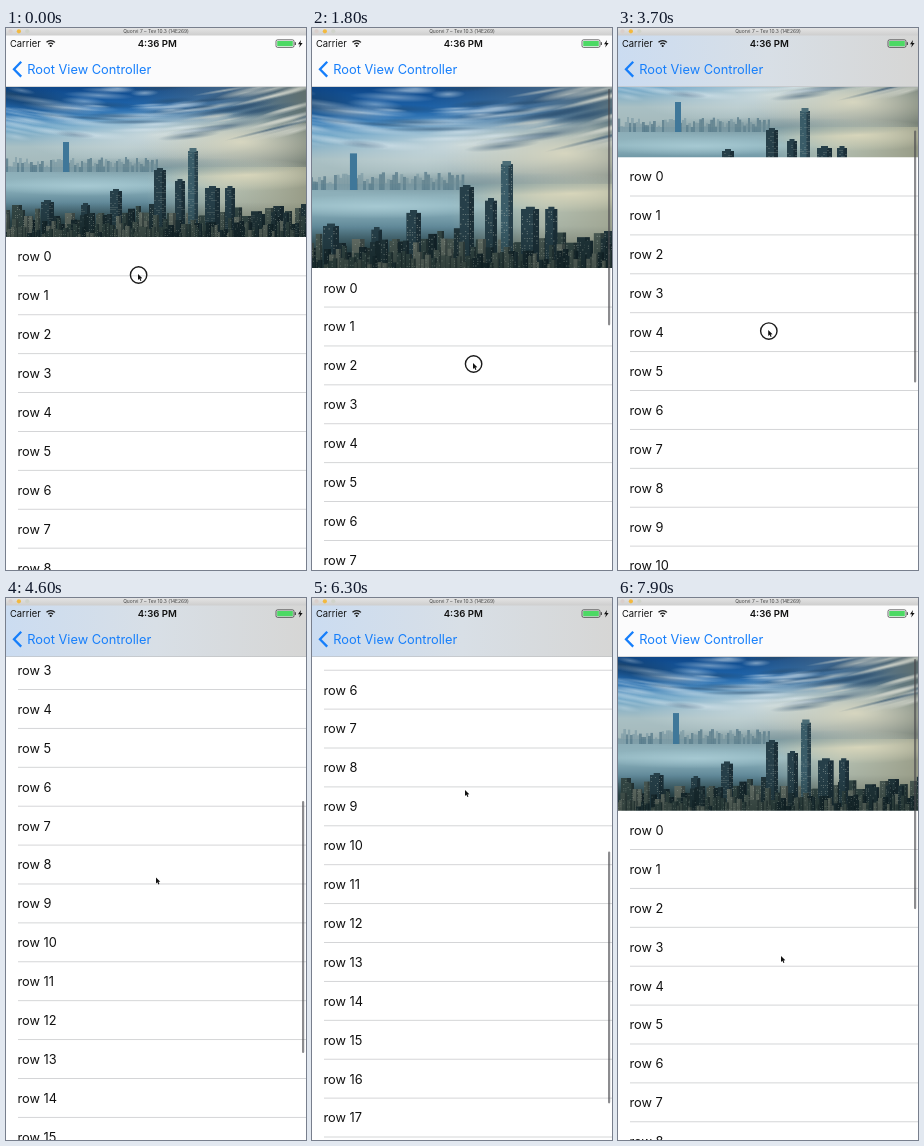
Write an HTML page with a canvas that moves like this. It is 300 px wide and 542 px high and loops after 8 s.

```html
<!DOCTYPE html>
<html lang="en">
<head>
<meta charset="utf-8">
<title>Stretchy header</title>
<style>
  html, body { margin: 0; width: 100%; height: 100%; overflow: hidden; background: #fff; }
  canvas { display: block; width: 300px; height: 542px; }
</style>
</head>
<body>
<canvas id="stage"></canvas>
<script>
const W = 300, H = 542, LOOP = 8000, STEP = 100;
const NAV = 59, HEAD = 150, ROW = 38.9, ROWS = 20;
const SLOP = 11, RUBBER = .4;
const FONT = 'Inter, Roboto, "Liberation Sans", sans-serif';
const BLUE = '#157efb';

const canvas = document.getElementById('stage');
const dpr = window.devicePixelRatio || 1;
canvas.width = W * dpr;
canvas.height = H * dpr;
const ctx = canvas.getContext('2d');
ctx.scale(dpr, dpr);

// Pointer stops: time, x, y
const stops = [
  [0, 132, 246], [900, 150, 385], [1800, 161, 335], [2700, 151, 393], [3000, 151, 393],
  [4000, 150, 277], [5500, 150, 284], [5900, 152, 214], [6300, 153, 192], [6800, 154, 192],
  [7400, 163, 358], [LOOP, 163, 358]
];
// Each drag ends in a glide that settles at rest
const drags = [
  { press: 0, release: 2000, rest: 0, glide: 120 },
  { press: 2700, release: 4000, rest: 310, glide: 350 },
  { press: 5500, release: 5900, rest: 372, glide: 350 },
  { press: 6800, release: 7400, rest: -6, glide: 110 }
];

const clamp = (v, a = 0, b = 1) => Math.min(b, Math.max(a, v));
const mix = (a, b, u) => a + (b - a) * u;
const ease = u => u * u * (3 - 2 * u);

function pointerAt(t) {
  const i = Math.max(1, stops.findIndex(s => s[0] >= t));
  const [t0, x0, y0] = stops[i - 1], [t1, x1, y1] = stops[i];
  const u = ease((t - t0) / (t1 - t0));
  return { x: mix(x0, x1, u), y: mix(y0, y1, u) };
}

// Content follows the finger, resists above the top, then decays to rest
function scrollAt(t) {
  let s = 0;
  for (const { press, release, rest, glide } of drags) {
    if (t < press) break;
    const moved = pointerAt(press).y - pointerAt(Math.min(t, release)).y;
    s += Math.sign(moved) * Math.max(0, Math.abs(moved) - SLOP);
    if (s < 0) s *= RUBBER;
    if (t > release) s = mix(rest, s, Math.exp((release - Math.min(t, nextPress(release))) / glide));
  }
  return s;
}

function nextPress(t) {
  const next = drags.find(d => d.press > t);
  return next ? next.press : LOOP;
}

function random(seed) {
  return () => (seed = (seed * 16807) % 2147483647) / 2147483647;
}

function ramp(c, x0, y0, x1, y1, colors) {
  const g = c.createLinearGradient(x0, y0, x1, y1);
  colors.forEach((color, i) => g.addColorStop(i / (colors.length - 1), color));
  return g;
}

function paintSkyline() {
  const art = document.createElement('canvas');
  art.width = W * 3;
  art.height = HEAD * 3;
  const c = art.getContext('2d');
  c.scale(3, 3);
  const rnd = random(77);
  const rect = (x, y, w, h, color) => { c.fillStyle = color; c.fillRect(x, y, w, h); };

  // Soft ellipse fading out to its rim
  const puff = (x, y, rx, ry, tilt, color, alpha) => {
    const g = c.createRadialGradient(0, 0, 0, 0, 0, 1);
    g.addColorStop(0, color);
    g.addColorStop(1, color + '00');
    c.save();
    c.globalAlpha = alpha;
    c.translate(x, y);
    c.rotate(tilt);
    c.scale(rx, ry);
    c.fillStyle = g;
    c.fillRect(-1, -1, 2, 2);
    c.restore();
  };

  // Sky, warmer to the right
  rect(0, 0, W, 85, ramp(c, 0, 0, 0, 80, ['#0d4688', '#2067ae', '#6fa6c8', '#a9c0c4', '#a5b9bb']));
  rect(0, 0, W, 85, ramp(c, 120, 0, W, 0, ['#7c858300', '#7c858366', '#6c7468dd']));
  puff(150, 48, 130, 26, -.04, '#d8e2e2', .85);
  puff(235, 55, 100, 30, 0, '#dedbc2', .9);
  puff(20, 12, 70, 14, .15, '#143b63', .8);
  for (let i = 0; i < 90; i++) {
    const x = rnd() * W, y = rnd() * 50;
    const dark = i % 3 === 0;
    puff(x, y, 14 + rnd() * 32, 1.5 + rnd() * 3, (150 - x) / 600 - .05,
      dark ? '#24486a' : x > 200 ? '#d3d6cc' : '#e0ecf2', dark ? .5 : .3 + x / 700);
  }

  // Harbour with a hazy far shore
  rect(0, 80, W, 70, ramp(c, 0, 80, 0, 135, ['#89a9b3', '#93b8c2', '#5f8797', '#2f4a50']));
  rect(140, 80, 160, 70, ramp(c, 140, 0, W, 0, ['#c3c4ac00', '#c3c4acbb', '#989c87']));
  puff(240, 88, 90, 16, 0, '#dcd9bd', .9);
  puff(80, 99, 100, 10, 0, '#abcdd6', .8);
  for (let x = 0; x < 150; x += 2.2) {
    const h = 5 + rnd() * 10;
    rect(x, 85 - h, 2.4, h, rnd() > .5 ? '#7d9ba6aa' : '#4a7081aa');
  }
  puff(150, 80, 150, 10, 0, '#6f8d95', .6);
  rect(57, 55, 6, 30, '#3f7799');

  // Near city, from the water's edge to the front
  const tones = ['#20343a', '#354846', '#4c5b55', '#182a30', '#6a746b'];
  const tower = (x, y, w, color) => {
    rect(x, y, w, HEAD - y, color);
    rect(x + w * .65, y, w * .35, HEAD - y, '#0a182066');
    for (let wy = y + 2; wy < HEAD; wy += 2)
      for (let wx = x + .5; wx < x + w - 1; wx += 2)
        if (rnd() > .65) rect(wx, wy, 1, 1, '#b4bfb366');
  };
  const block = (base, spread, step) => {
    for (let x = -3; x < W; x += step * (.6 + rnd() * .5))
      tower(x, base + rnd() * spread, step * (.6 + rnd() * .6), tones[Math.floor(rnd() * 5)]);
  };
  block(116, 22, 9);
  const landmarks = [[35, 115, 13], [75, 118, 9], [104, 104, 12], [148, 83, 12],
    [169, 94, 10], [199, 101, 15], [219, 101, 10]];
  for (const [x, y, w] of landmarks) {
    tower(x, y, w, '#263f49');
    rect(x + w * .25, y - 2, w * .5, 3, '#263f49');
  }
  tower(182, 64, 10, '#3a5c68');
  rect(183.5, 61, 7, 4, '#4b6c76');
  block(125, 20, 6);
  block(135, 12, 5);
  rect(0, 115, W, 35, ramp(c, 0, 115, 0, HEAD, ['#0c1a1800', '#0c1a1866']));
  return art;
}

const skyline = paintSkyline();

function text(str, x, y, size, color, weight = 400, align = 'left') {
  ctx.font = `${weight} ${size}px ${FONT}`;
  ctx.fillStyle = color;
  ctx.textAlign = align;
  ctx.fillText(str, x, y);
}

function box(x, y, w, h, color) {
  ctx.fillStyle = color;
  ctx.fillRect(x, y, w, h);
}

function dot(x, y, r, color) {
  ctx.fillStyle = color;
  ctx.beginPath();
  ctx.arc(x, y, r, 0, 7);
  ctx.fill();
}

function ring(x, y, r, from, to, width) {
  ctx.strokeStyle = '#1a1a1a';
  ctx.lineWidth = width;
  ctx.beginPath();
  ctx.arc(x, y, r, from, to);
  ctx.stroke();
}

function shape(x, y, path) {
  ctx.save();
  ctx.translate(x, y);
  ctx.fillStyle = '#111';
  ctx.fill(new Path2D(path));
  ctx.restore();
}

function drawHeader(s) {
  const bottom = NAV + HEAD - s;
  if (bottom <= NAV) return;
  ctx.save();
  ctx.beginPath();
  ctx.rect(0, NAV, W, bottom - NAV);
  ctx.clip();
  const zoom = Math.max(1, 1 - s / HEAD);
  const top = NAV - Math.max(0, s) / 2;
  ctx.drawImage(skyline, W / 2 * (1 - zoom), top, W * zoom, HEAD * zoom);
  ctx.restore();
}

function drawRows(s, picked) {
  for (let i = 0; i < ROWS; i++) {
    const y = NAV + HEAD + i * ROW - s;
    if (i === picked) box(0, y - .5, W, ROW, '#d1d1cd');
    else box(12, y + ROW - .5, W - 12, .9, '#d0d1d3');
    text('row ' + i, 11.5, y + 24.3, 12.8, '#111');
  }
}

function drawBar(s, alpha) {
  const top = NAV + 2 + Math.max(0, s) * .52;
  const length = 252 + Math.min(0, s) / 2;
  ctx.fillStyle = `rgba(70,70,74,${.62 * alpha})`;
  ctx.beginPath();
  ctx.roundRect(296, top, 2.2, length, 1.1);
  ctx.fill();
}

function drawNav(s) {
  box(0, 0, W, NAV, '#fbfbfc');
  ctx.globalAlpha = clamp(s / 50);
  box(0, 0, W, NAV, ramp(ctx, 0, 0, W, 0, ['#cbdcf1', '#d8dfe6', '#d6d6d5']));
  ctx.globalAlpha = 1;
  box(0, NAV - 1, W, .6, '#bcbec0');

  box(0, 0, W, 7.5, ramp(ctx, 0, 0, 0, 7, ['#e4e4e4', '#cfcfcf']));
  ['#d9cfcc', '#f3b93e', '#d0d3cb'].forEach((color, i) => dot(4.5 + i * 8.4, 3.3, 2.1, color));
  text('Quorvi 7 – Tev 10.3 (14E269)', 150, 5.1, 4.9, '#444', 400, 'center');

  text('Carrier', 4, 18.9, 9.4, '#111');
  text('4:36 PM', 151.3, 19, 9.6, '#111', 600, 'center');
  ring(44.7, 18.6, 3.3, -2.35, -.79, 1.3);
  ring(44.7, 18.6, 6, -2.35, -.79, 1.3);
  dot(44.7, 18, 1.1, '#111');

  ctx.lineWidth = .7;
  ctx.strokeStyle = '#333';
  ctx.beginPath();
  ctx.roundRect(270, 11.8, 18, 7.6, 1.6);
  ctx.stroke();
  box(271.2, 13, 15.6, 5.2, '#4cd964');
  box(288.8, 14.2, 1, 2.8, '#333');
  shape(292, 12, 'M3 0L0 4.2H2L1.2 7.4L4.6 3H2.5Z');

  ctx.strokeStyle = BLUE;
  ctx.lineWidth = 2.3;
  ctx.stroke(new Path2D('M15.2 33.8L8 41.2L15.2 48.6'));
  text('Root View Controller', 21.3, 46, 12.8, BLUE);
}

function drawPointer({ x, y }, pressed) {
  if (pressed) ring(x + .6, y + 1, 8.2, 0, 7, 1.4);
  shape(x, y, 'M0 0V6L1.4 4.8L2.4 7L3.4 6.5L2.5 4.4L4.3 4.3Z');
}

function draw(t) {
  const s = scrollAt(t);
  const pressed = drags.some(d => t >= d.press && t < d.release);
  const touched = t >= 2800 && t < 3200;
  const resting = t < 200 || (t > 2500 && t < 3200);
  box(0, 0, W, H, '#fff');
  drawHeader(s);
  drawRows(s, touched ? 4 : -1);
  if (!resting) drawBar(s, clamp((t - 100) / 200));
  drawNav(s);
  drawPointer(pointerAt(t), pressed);
}

const start = performance.now();
function tick() {
  const t = (performance.now() - start) % LOOP;
  draw(Math.floor(t / STEP) * STEP);
  requestAnimationFrame(tick);
}
tick();
</script>
</body>
</html>
```
